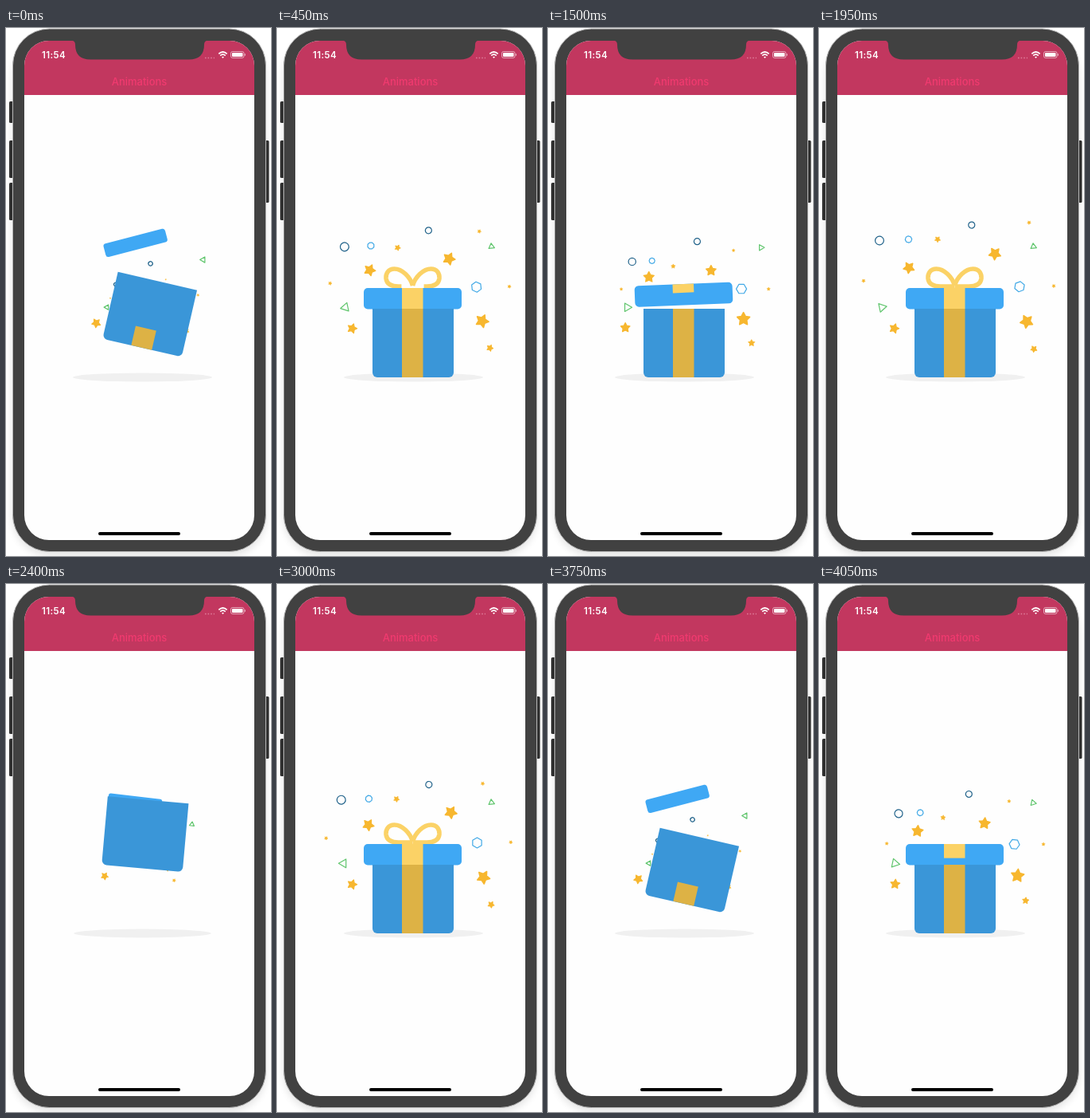
These frames come from a looping animation (333 px wide and 662 px high, 4150 ms). An HTML page with a canvas:

```html
<!DOCTYPE html>
<html lang="en">
<head>
<meta charset="utf-8">
<title>Animations</title>
<style>
  html, body { margin: 0; width: 100%; height: 100%; overflow: hidden; background: #fff; }
  svg, canvas { position: absolute; left: 0; top: 0; width: 333px; height: 662px; }
  text { font-family: Inter, "Open Sans", sans-serif; }
</style>
</head>
<body>
<svg viewBox="0 0 333 662">
  <defs>
    <clipPath id="screen"><rect x="23" y="16" width="289" height="626" rx="31"/></clipPath>
    <filter id="soft" x="-20%" y="-10%" width="140%" height="120%"><feGaussianBlur stdDeviation="5"/></filter>
  </defs>
  <rect x="8" y="12" width="319" height="650" rx="48" fill="#000" opacity=".1" filter="url(#soft)"/>
  <g fill="#303030">
    <rect x="4" y="92" width="6" height="27" rx="1.5"/>
    <rect x="4" y="141" width="6" height="47" rx="1.5"/>
    <rect x="4" y="194" width="6" height="47" rx="1.5"/>
    <rect x="325" y="141" width="5.5" height="78" rx="1.5"/>
  </g>
  <rect x="8.5" y="1" width="318" height="655.5" rx="46" fill="#414141" stroke="#b8b8b8"/>
  <g clip-path="url(#screen)">
    <rect x="23" y="16" width="289" height="626" fill="#fefefe"/>
    <rect x="23" y="16" width="289" height="68" fill="#c2375f"/>
    <path d="M82 15.500Q87 16 87 21Q87 39.500 106 39.500H230Q249 39.500 249 21Q249 16 254 15.500Z" fill="#414141"/>
  </g>
  <text x="45" y="38" font-size="11.5" font-weight="600" letter-spacing=".4" fill="#fff">11:54</text>
  <text x="167.500" y="71.500" font-size="13" font-weight="500" text-anchor="middle" fill="#f03a6f">Animations</text>
  <path d="M250 37.500h12" stroke="#de7c99" stroke-width="1.600" stroke-dasharray="1.600 2" fill="none"/>
  <g fill="none" stroke="#fff" stroke-width="1.700">
    <path d="M267.300 32.300Q272.500 27.700 277.700 32.300M269.200 34.700Q272.500 31.700 275.800 34.700"/>
    <path d="M271 36.300Q272.500 35 274 36.300L272.500 38Z" fill="#fff" stroke="none"/>
    <rect x="282.500" y="29.500" width="16.500" height="8" rx="2.200" stroke-width=".8" opacity=".7"/>
    <rect x="284" y="31" width="13.500" height="5" rx="1" fill="#fff" stroke="none"/>
    <path d="M300.300 32.300v2.400" stroke-width="1" opacity=".7"/>
  </g>
  <rect x="116" y="632" width="103" height="4" rx="2" fill="#000"/>
</svg>
<canvas id="stage"></canvas>
<script>
const LOOP = 4150, STEP = 150, CYCLE = 1250, OFFSET = 450;
const canvas = document.getElementById('stage');
const ctx = canvas.getContext('2d');
const dpr = window.devicePixelRatio || 1;
canvas.width = 333 * dpr;
canvas.height = 662 * dpr;

const BOX = '#3a96d8', LID = '#3fa8f4', BAND = '#ddb245', BOW = '#fbd266';
const GOLD = '#f7b72f', NAVY = '#20628a', SKY = '#42a9e6', GREEN = '#5fc56c';

// kind, colour, end x, end y, radius, start, duration, easing power
const bits = [
  ['tri', GREEN, 269.5, 274, 4.2, 50, 750, 2],
  ['star', GOLD, 94.5, 376.7, 6.8, 50, 800, 2],
  ['star', GOLD, 270, 402.5, 4.8, 140, 900, 2],
  ['ring', NAVY, 191.8, 247, 4, 120, 1050, 2],
  ['tri', GREEN, 79, 350.3, 6.2, 175, 1000, 2],
  ['star', GOLD, 56, 317, 2.6, 230, 800, 1.3],
  ['star', GOLD, 264, 244, 2.7, 240, 800, 1.3],
  ['star', GOLD, 295, 323.5, 2.5, 140, 900, 2],
  ['ring', NAVY, 76, 266.5, 5.4, 230, 800, 1.3],
  ['oct', SKY, 112.5, 265, 4.2, 230, 800, 1.3],
  ['star', GOLD, 113, 300.5, 8, 200, 850, 1.6],
  ['star', GOLD, 149, 265, 4.2, 260, 730, 1],
  ['star', GOLD, 221, 283, 8.6, 230, 800, 1.3],
  ['hex', SKY, 252, 324.3, 6.5, 30, 1000, 2],
  ['star', GOLD, 261, 368, 9.2, 170, 900, 2]
];
const SIDES = { tri: 3, hex: 6, oct: 8 };

const clamp = v => Math.min(1, Math.max(0, v));
const ramp = (t, from, to) => clamp((t - from) / (to - from));
const easeOut = (u, power) => 1 - Math.pow(1 - u, power);

function track(keys) {
  return t => {
    const i = keys.findIndex(k => k[0] >= t);
    if (i === 0) return keys[0][1];
    if (i < 0) return keys[keys.length - 1][1];
    const [t0, a] = keys[i - 1], [t1, b] = keys[i];
    return a + (b - a) * (t - t0) / (t1 - t0);
  };
}

const boxY = track([[50, 438], [100, 437], [150, 424], [200, 399], [250, 373], [300, 357],
  [325, 354], [350, 356.5], [400, 373], [450, 401], [500, 427], [550, 438]]);
const boxTurn = track([[50, 0], [100, -4.3], [150, -6.6], [200, -5.5], [270, 0], [350, 5.1], [450, 13], [500, 8], [550, 0]]);
const lidY = track([[250, 345], [300, 300], [350, 273.5], [400, 268], [450, 269.5], [500, 276],
  [550, 287], [600, 303], [650, 320], [700, 334.5], [750, 339.5]]);
const lidX = track([[350, 162], [450, 162.7], [700, 170.5]]);
const lidTurn = track([[350, 6.5], [400, -5], [450, -14.5], [500, -17], [550, -15], [600, -10], [700, -2.2], [750, 0]]);
const lidSize = track([[250, 0.4], [350, 0.55], [450, 0.65], [600, 0.88], [700, 1]]);

const bowLoop = new Path2D('M0 -16.500C-3 -27 -13 -37.500 -23 -37.500C-31 -37.500 -34 -31 -33.500 -25.500C-32.500 -17 -25 -15.500 -18 -15.500H0');
const BOW_LENGTH = 102;

function place(x, y, degrees, scale, draw) {
  ctx.save();
  ctx.translate(x, y);
  ctx.rotate(degrees * Math.PI / 180);
  ctx.scale(scale, scale);
  draw();
  ctx.restore();
}

function fillRect(color, x, y, w, h, radii = 0) {
  ctx.fillStyle = color;
  ctx.beginPath();
  ctx.roundRect(x, y, w, h, radii);
  ctx.fill();
}

function polygon(count, radius) {
  ctx.beginPath();
  for (let i = 0; i < count; i++) {
    const a = i * 2 * Math.PI / count, r = radius(i);
    ctx.lineTo(r * Math.cos(a), r * Math.sin(a));
  }
  ctx.closePath();
}

function drawBit([kind, color, x, y, r, start, length, power], t) {
  const f = easeOut(ramp(t, start, start + length), power);
  if (!f) return;
  const size = r * Math.min(1, 1.25 * f);
  const turn = (Math.min(t, start + length) - 700) * (kind === 'tri' ? 0.24 : 0.12);
  place(170 + (x - 170) * f, 350 + (y - 350) * f, turn, 1, () => {
    ctx.fillStyle = ctx.strokeStyle = color;
    ctx.lineJoin = 'round';
    ctx.lineWidth = 1.2;
    if (kind === 'star') {
      ctx.rotate(-Math.PI / 2);
      ctx.lineWidth = size * 0.18;
      polygon(10, i => size * (i % 2 ? 0.47 : 0.9));
      ctx.fill();
    } else if (kind === 'ring') {
      ctx.beginPath();
      ctx.arc(0, 0, size, 0, 2 * Math.PI);
    } else {
      polygon(SIDES[kind], () => size);
    }
    ctx.stroke();
  });
}

function drawLid(t) {
  if (t < 260) return;
  place(lidX(t), lidY(t), lidTurn(t), lidSize(t), () => {
    const bow = ramp(t, 815, 930);
    if (bow) {
      ctx.strokeStyle = BOW;
      ctx.lineWidth = 5.6;
      ctx.setLineDash([BOW_LENGTH * bow, BOW_LENGTH * 2]);
      ctx.stroke(bowLoop);
      ctx.scale(-1, 1);
      ctx.stroke(bowLoop);
      ctx.scale(-1, 1);
    }
    fillRect(LID, -61.5, -13.5, 123, 26.5, 5);
    fillRect(BOW, -13.5, -13.5, 26.5, 26.5 * ramp(t, 620, 815));
  });
}

function drawBox(t) {
  const h = 86 * ramp(t, 10, 205);
  if (!h) return;
  place(171, boxY(t), boxTurn(t), 1, () => {
    fillRect(BOX, -51, -h, 102, h, [0, 0, 6, 6]);
    const band = 86 * ramp(t, 395, 585);
    fillRect(BAND, -14, -band, 26.5, band);
  });
}

function drawShadow(t) {
  const s = easeOut(ramp(t, 50, 390), 2);
  ctx.fillStyle = '#f0f0f0';
  ctx.beginPath();
  ctx.ellipse(171.5, 438, 87.5 * s, 5.5 * s, 0, 0, 2 * Math.PI);
  ctx.fill();
}

function render(now) {
  const time = Math.floor(now % LOOP / STEP) * STEP;
  const t = (time + OFFSET) % CYCLE;
  ctx.setTransform(dpr, 0, 0, dpr, 0, 0);
  ctx.clearRect(0, 0, 333, 662);
  drawShadow(t);
  bits.forEach(bit => drawBit(bit, t));
  drawLid(t);
  drawBox(t);
}

const began = performance.now();
function tick() {
  render(performance.now() - began);
  requestAnimationFrame(tick);
}
tick();
</script>
</body>
</html>
```
